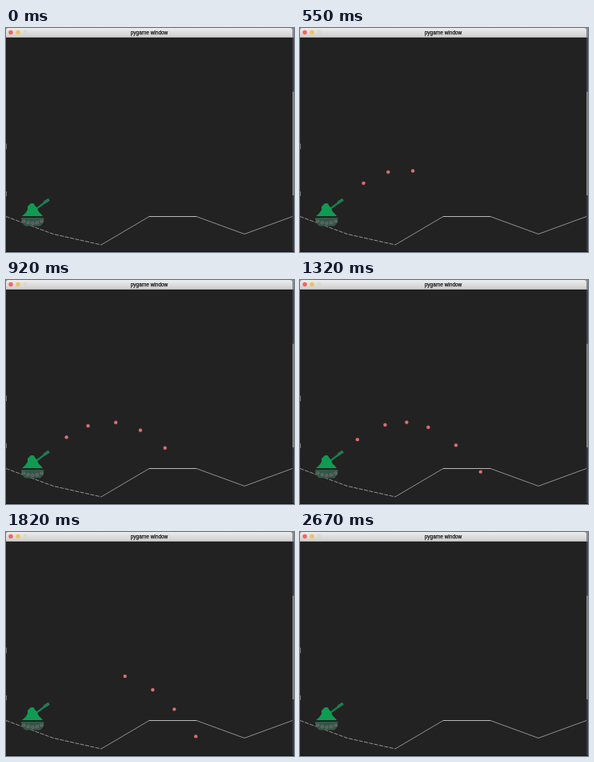
These frames come from a looping animation (360x281 px, 2.7 s). An HTML page with a canvas:

```html
<!DOCTYPE html>
<html lang="en">
<head>
<meta charset="utf-8">
<title>pygame window</title>
<style>
  html, body { margin: 0; width: 100%; height: 100%; overflow: hidden; background: #222; }
  canvas { display: block; width: 360px; height: 281px; }
</style>
</head>
<body>
<canvas id="stage" width="360" height="281"></canvas>
<script>
const ctx = document.getElementById('stage').getContext('2d');
const LOOP = 2700;
const STEPS_PER_MS = 0.0393, FIRST_STEP = 1.4;
const FREEZE = { from: 1090, to: 1320 };    // the game stutters once

const SHOTS = [0, 8, 16, 25, 32, 39, 48];   // game step of each shot
const MUZZLE = { x: 52.5, steps: 3 };       // a shot shows after a few steps
const STEP_X = 3.85;
const APEX = { x: 129, y: 178.3 }, CURVE = 0.00666;

function stepsAt(time) {
  const frozen = time > FREEZE.from && time < FREEZE.to;
  return Math.round(FIRST_STEP + STEPS_PER_MS * (frozen ? FREEZE.from : time));
}

function rect(color, x, y, w, h) {
  ctx.fillStyle = color;
  ctx.fillRect(x, y, w, h);
}

function dot(color, x, y, r) {
  ctx.fillStyle = color;
  ctx.beginPath();
  ctx.arc(x, y, r, 0, Math.PI * 2);
  ctx.fill();
}

function trace(points) {
  ctx.beginPath();
  points.forEach(([x, y]) => ctx.lineTo(x, y));
}

function polygon(color, points) {
  trace(points);
  ctx.fillStyle = color;
  ctx.fill();
}

function line(color, width, points, dash = []) {
  trace(points);
  ctx.setLineDash(dash);
  ctx.strokeStyle = color;
  ctx.lineWidth = width;
  ctx.stroke();
}

function drawWindow() {
  rect('#222222', 0, 0, 360, 281);
  rect('#151515', 0, 280, 360, 1);

  // Slivers of desktop beside the window
  rect('#444444', 358, 12, 2, 68);
  rect('#85827c', 358, 80, 2, 130);
  rect('#3a3a3a', 358, 210, 2, 70);
  rect('#777', 0, 145, 1, 7);
  rect('#777', 0, 205, 1, 6);

  const bar = ctx.createLinearGradient(0, 0, 0, 12);
  bar.addColorStop(0, '#ededed');
  bar.addColorStop(0.9, '#d0d0d0');
  bar.addColorStop(1, '#a8a8a8');
  rect('#8a8a8a', 0, 0, 360, 12);
  ctx.fillStyle = bar;
  ctx.beginPath();
  ctx.roundRect(0, 0, 358, 12, [3, 3, 0, 0]);
  ctx.fill();

  ['#f0655f', '#f2bf5c', '#dad9cc'].forEach((color, i) => dot(color, 6 + 9 * i, 5.5, 2.7));

  ctx.fillStyle = ctx.strokeStyle = '#1c1c1c';
  ctx.font = '6.5px "Liberation Sans", Arial, sans-serif';
  ctx.textAlign = 'center';
  ctx.lineWidth = 0.25;
  ctx.setLineDash([]);
  ctx.fillText('pygame window', 179, 8);
  ctx.strokeText('pygame window', 179, 8);
}

function drawGround() {
  line('#a0a0a0', 0.9, [[0, 236.5], [59, 258.5], [119, 272]], [5, 1.5]);
  line('#9c9c9c', 0.9, [[119, 272], [179, 236.5]]);
  line('#b8b8b8', 1, [[179, 236.5], [238, 236.5]]);
  line('#9c9c9c', 0.9, [[238, 236.5], [298, 258.5], [358, 236.5]]);
}

function drawTank() {
  line('#17804e', 2.2, [[37, 227.5], [49, 218.5]]);
  line('#1f7c55', 3.6, [[47.5, 219.3], [53.8, 215]]);
  polygon('#109a52', [[31, 220], [34.5, 220], [36.5, 223], [39, 226], [40.5, 230],
    [43, 232.5], [46, 236], [20, 236], [24, 232.5], [27, 228], [27, 224]]);
  rect('#16281f', 19, 236, 29, 2.2);
  polygon('#34574a', [[19, 238], [47.5, 238], [47, 244], [43, 248.5], [24, 248.5], [19.5, 244]]);
  for (let i = -2; i <= 2; i++) {
    const x = 33.3 + 5.6 * i, y = 245 - 0.7 * i * i;
    dot('#726c68', x, y, 2);
    dot('#5a4644', x, y, 0.9);
  }
}

function drawShots(time) {
  const now = stepsAt(time);
  for (const fired of SHOTS) {
    const age = now - fired;
    if (age < MUZZLE.steps) continue;
    const x = MUZZLE.x + STEP_X * age;
    dot('#da6d6e', x, APEX.y + CURVE * (x - APEX.x) ** 2, 2.2);
  }
}

function render(time) {
  drawWindow();
  drawGround();
  drawTank();
  drawShots(time);
}

const start = performance.now();
function tick() {
  render((performance.now() - start) % LOOP);
  requestAnimationFrame(tick);
}
tick();
</script>
</body>
</html>
```
